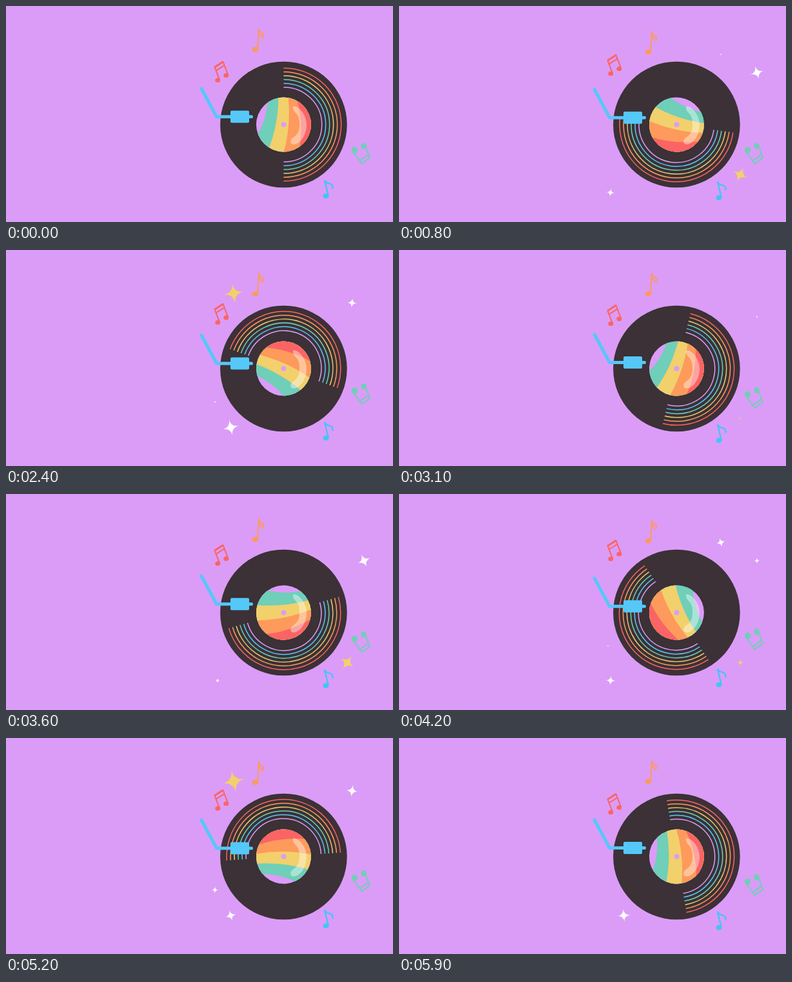
An HTML page for the animation above (6 s loop, 600 px wide and 337 px high).

```html
<!DOCTYPE html>
<html lang="en">
<head>
<meta charset="utf-8">
<title>Spinning record</title>
<style>
  html, body { margin: 0; width: 100%; height: 100%; overflow: hidden; background: #db9cf7; }
  svg { display: block; width: 100vw; height: 100vh; }
</style>
</head>
<body>
<svg viewBox="0 0 600 337" preserveAspectRatio="none">
  <defs><clipPath id="round"><circle r="42.5"/></clipPath></defs>
  <rect width="600" height="337" fill="#db9cf7"/>
  <circle cx="430.4" cy="185" r="98.3" fill="#3b3136"/>
  <g id="disc">
    <g id="grooves" fill="none" stroke-width="1.5"></g>
    <g clip-path="url(#round)">
      <circle r="43" fill="#db9cf7"/>
      <path fill="#6fcfb8" d="M-24-42Q-26-8-42 18V60H60V-60H-24Z"/>
      <path fill="#f2d06b" d="M-8-44Q-8 0-24 40V60H60V-60H-8Z"/>
      <path fill="#fd9a5c" d="M7-44Q12 0 0 44V60H60V-60H7Z"/>
      <path fill="#fb6464" d="M20-42Q32 0 24 40V60H60V-60H20Z"/>
    </g>
  </g>
  <path fill="#fff" fill-opacity=".4" d="M446 156.5C452 155 466 168 466 185C466 203 455 216 446 216C440 216 440 209 444 206C453 200 455 195 455 183C455 170 449 168 446 163C445 160 444 157 446 156.5Z"/>
  <circle cx="430.5" cy="185" r="4" fill="#db9cf7"/>

  <g id="arm" fill="#55c8f8" stroke="#55c8f8">
    <path d="M303 128.5L326.5 172.5H380.5" fill="none" stroke-width="5" stroke-linecap="round" stroke-linejoin="round"/>
    <rect x="348" y="163" width="29" height="19" rx="2" stroke="none"/>
  </g>

  <g id="red" fill="#fb6464" stroke="#fb6464" stroke-width="2" stroke-linejoin="round">
    <path fill="none" d="M331 115L323.5 95.5L336.5 87L344 107M325.5 101L339 92.5"/>
    <path d="M323.5 95.5L336.5 87" stroke-width="3"/>
    <ellipse cx="328.3" cy="115.8" rx="3" ry="2.5"/>
    <ellipse cx="341.3" cy="108.3" rx="3" ry="2.5"/>
  </g>
  <g id="orange" fill="#fd9a5c" stroke="#fd9a5c" stroke-width="2" stroke-linejoin="round">
    <path fill="none" d="M390 67L392 36Q393 41 398 43Q401 46 397 51M391.5 41Q393 46 397 48"/>
    <ellipse cx="386.5" cy="68" rx="3.8" ry="3" transform="rotate(-15 386.5 68)"/>
  </g>
  <g id="green" fill="#6fcfb8" stroke="#6fcfb8" stroke-width="2" stroke-linejoin="round">
    <path fill="none" d="M537.5 227L551.5 246.5L564 237.5L557.5 220M548.5 242L561.5 233"/>
    <ellipse cx="540.5" cy="225.3" rx="3.6" ry="4"/>
    <ellipse cx="554.5" cy="218.8" rx="3.2" ry="3.8"/>
  </g>
  <g id="blue" fill="#45c4f5" stroke="#45c4f5" stroke-width="2.3" stroke-linejoin="round">
    <path fill="none" d="M499.8 297L494 273Q496 277 502 278Q508 280 506 286"/>
    <ellipse cx="496" cy="297.3" rx="3.4" ry="2.8"/>
  </g>
  <g id="stars"></g>
</svg>
<script>
const LOOP = 6000, BEAT = LOOP / 2, STEP = 100, TWINKLE = 1350;
const WHITE = '#fff', GOLD = '#f2d06b';
const $ = id => document.getElementById(id);
const place = (el, value) => el.setAttribute('transform', value);

function add(parent, attrs) {
  const el = document.createElementNS('http://www.w3.org/2000/svg', 'path');
  for (const k in attrs) el.setAttribute(k, attrs[k]);
  return parent.appendChild(el);
}

['#fb6464', '#fd9a5c', '#f2d06b', '#6fcfb8', '#55c8f8', '#db9cf7'].forEach((stroke, i) => {
  const r = 88.3 - i * 6;
  add($('grooves'), { d: `M0 ${-r}A${r + 1} ${r} 0 0 1 0 ${r}`, stroke });
});

// Vertical bobbing: mid height, swing, time of the lowest point, period
const bobs = {
  arm: { mid: 2.6, swing: 3.5, low: 270, period: LOOP / 8 },
  red: { mid: -7.3, swing: -7.6, low: 1350, period: BEAT },
  orange: { mid: 2.3, swing: 2.7, low: 1250, period: BEAT },
  green: { mid: -3.7, swing: 4.6, low: 400, period: BEAT },
  blue: { mid: -1.2, swing: 3, low: 700, period: BEAT }
};

// Each star swells and fades once per beat while its tilt unwinds to zero
const star = (x, y, fill, born, size, tilt) => ({
  x, y, born, size, tilt,
  el: add($('stars'), { fill, d: 'M0-1Q.07-.07 1 0Q.07 .07 0 1Q-.07 .07-1 0Q-.07-.07 0-1Z' })
});
const stars = [
  star(555, 104, WHITE, 30, 10.5, -40),
  star(529, 263, GOLD, 30, 12.5, 60),
  star(328, 291, WHITE, 380, 7.5, 15),
  star(499, 75.5, WHITE, 720, 7.5, -25),
  star(324, 237, WHITE, 1130, 8.5, 45),
  star(536.5, 82.5, WHITE, 1420, 9.2, 20),
  star(353, 67.5, GOLD, 1500, 17.5, -25),
  star(348.5, 277, WHITE, 1900, 13, -20)
];

function draw(ms) {
  const t = Math.floor(ms % LOOP / STEP) * STEP, beat = t % BEAT;
  const spin = 360 * t / BEAT + 2 * Math.min(1, t / STEP);
  place($('disc'), `translate(430.4 185) rotate(${spin})`);
  for (const id in bobs) {
    const { mid, swing, low, period } = bobs[id];
    place($(id), `translate(0 ${mid + swing * Math.cos(2 * Math.PI * (t - low) / period)})`);
  }
  for (const s of stars) {
    const p = Math.min(1, Math.max(0, (beat - s.born) / TWINKLE));
    const scale = s.size * Math.sin(Math.PI * p);
    place(s.el, `translate(${s.x} ${s.y}) rotate(${s.tilt * (1 - p)}) scale(${scale})`);
  }
}

const start = performance.now();
function tick(now) {
  draw(Math.max(0, now - start));
  requestAnimationFrame(tick);
}
draw(0);
requestAnimationFrame(tick);
</script>
</body>
</html>
```
